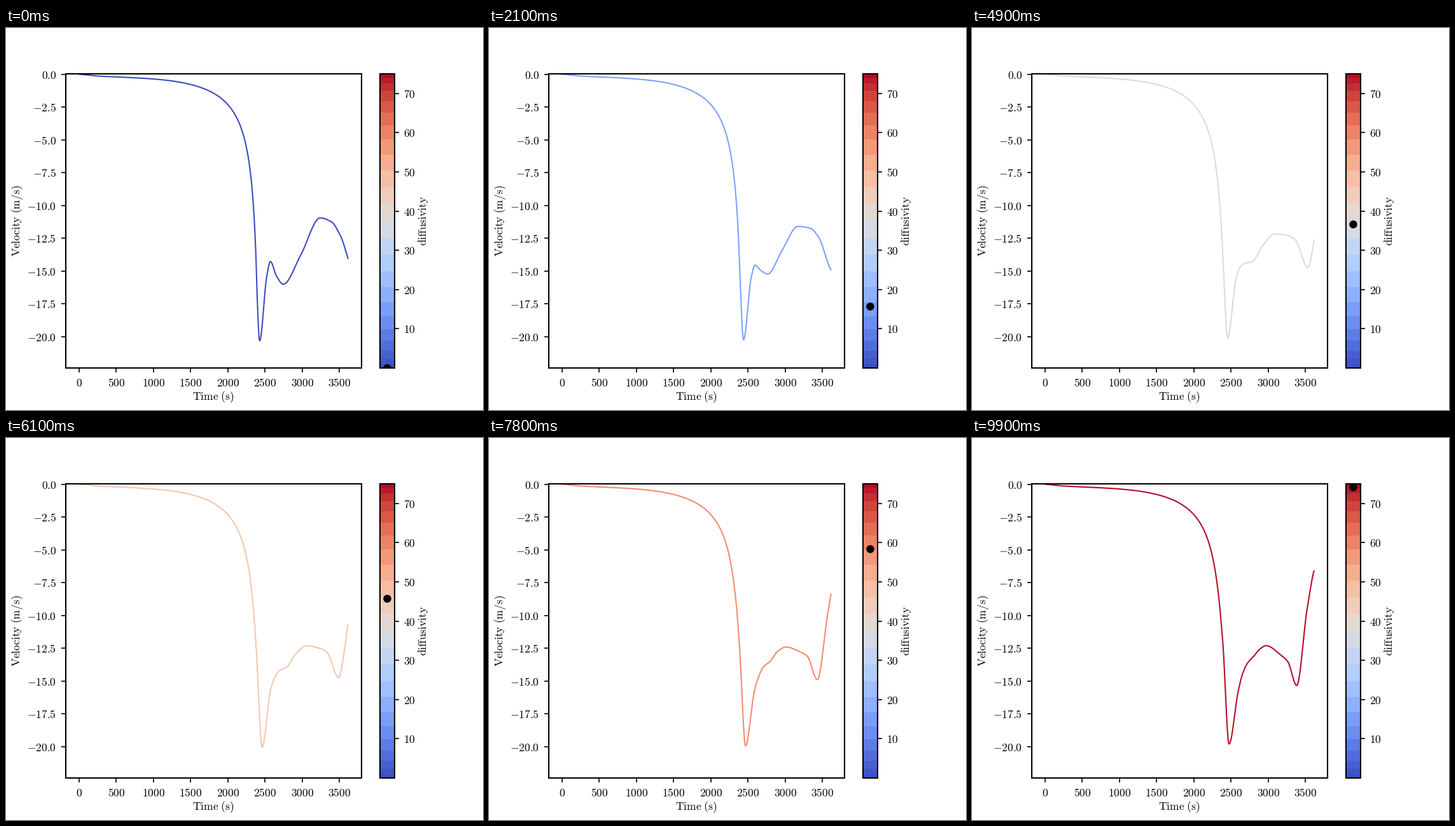
Recreate the animation shown at these times as a matplotlib script. Size 750 by 600 pixels, loop 10000 ms.

```python
import numpy as np
import matplotlib.pyplot as plt
from matplotlib.animation import FuncAnimation

plt.rcParams.update({"mathtext.fontset": "cm", "font.size": 8.4,
                     "axes.linewidth": 1})

FRAMES, D_MAX = 100, 75
T_END = 3.615  # thousands of seconds
cmap = plt.get_cmap("coolwarm")


def fall(s):
    """Slow start, then a hyperbolic plunge that stops short of its pole."""
    pole = 2.468
    d = np.geomspace(pole, 0.075, 40)
    t = pole - d
    drag = (0.796 * d + 0.577 * d ** 3 / (1 + (d / 2.22) ** 4)
            + 0.065 * s * np.exp(-d / 0.068))
    return t, -(1 - np.exp(-t / 0.21)) / drag


def turns(s):
    """Turning points, each gliding from a first to a last place."""
    ease = 1 - (1 - s) ** 1.3

    def glide(t0, v0, t1, v1, bow=0):
        return (t0 + (t1 - t0) * ease,
                v0 + (v1 - v0) * ease + bow * 4 * s * (1 - s))

    return np.transpose([
        glide(2.428, -20.31, 2.474, -19.79, -0.1),   # deepest dip
        glide(2.523, -15.42, 2.596, -15.81),
        glide(2.573, -14.27, 2.652, -14.50, -0.33),  # first crest
        glide(2.656, -15.40, 2.716, -13.68),
        glide(2.746, -16.00, 2.810, -13.07),         # shallow trough
        glide(2.981, -13.77, 2.887, -12.56),
        glide(3.242, -10.95, 2.972, -12.29, -0.44),  # second crest
        glide(3.400, -11.28, 3.169, -13.02),
        glide(3.511, -12.27, 3.263, -13.53, 0.36),
        glide(3.742, -15.60, 3.383, -15.37, 0.75),   # last trough
        glide(3.862, -12.75, 3.520, -9.60),
        glide(3.956, -9.36, 3.622, -6.45)])


def smooth(x, y, q):
    """Monotone cubic interpolation that keeps every turning point."""
    h = np.diff(x)
    d = np.diff(y) / h
    a, b = d[:-1], d[1:]
    w1, w2 = 2 * h[1:] + h[:-1], h[1:] + 2 * h[:-1]
    m = np.zeros(len(x))
    ok = np.flatnonzero(a * b > 0)
    m[ok + 1] = (w1 + w2)[ok] / (w1[ok] / a[ok] + w2[ok] / b[ok])
    m[0], m[-1] = d[0], 0.6 * d[-1]
    k = np.clip(np.searchsorted(x, q) - 1, 0, len(h) - 1)
    t = (q - x[k]) / h[k]
    s = t * t * (3 - 2 * t)
    return (y[k] + (y[k + 1] - y[k]) * s
            + h[k] * t * (1 - t) * (m[k] * (1 - t) - m[k + 1] * t))


time = np.linspace(0, T_END, 800)


def velocity(s):
    t, v = np.hstack([fall(s), turns(s)])
    return smooth(t, v, time)


def roman(text):
    return r"$\mathrm{%s}$" % text.replace(" ", r"\ ")


def label(x, y, text, turn=0):
    fig.text(x / 750, 1 - y / 600, roman(text), rotation=turn,
             ha="center", va="center")


fig = plt.figure(figsize=(5, 4), dpi=150, facecolor="white")
ax = fig.add_axes([0.125, 0.11, 0.62, 0.77])
ax.set(xlim=(-50 * T_END, 1050 * T_END), ylim=(-22.38, 0.025))
xticks, yticks = np.arange(0, 3501, 500), np.arange(-20, 0.1, 2.5)
ax.set_xticks(xticks, [roman(f"{v:d}") for v in xticks])
ax.set_yticks(yticks, [roman(f"{v:.1f}") for v in yticks])

# Colour steps are narrow at both ends and wide in the middle.
cax = fig.add_axes([0.78375, 0.11, 0.0308, 0.77])
u = np.linspace(-1, 1, 25)
edges = D_MAX / 2 * (1 + 1.4 * u - 0.4 * u ** 3)
mids = (edges[:-1] + edges[1:]) / 2
cax.pcolormesh([0, 1], edges, mids[:, None], cmap=cmap, vmin=0, vmax=D_MAX)
cax.set(xlim=(0, 1), ylim=(0, D_MAX), xticks=[])
levels = range(10, 71, 10)
cax.set_yticks(levels, [roman(str(v)) for v in levels])
cax.yaxis.tick_right()

label(326, 579.3, "Time (s)")
label(17.5, 303, "Velocity (m/s)", 90)
label(656.5, 303, "diffusivity", 90)

line, = ax.plot([], [], lw=1)
dot, = cax.plot([], [], "o", color="black", ms=6, mew=0)


def update(i):
    s = i / FRAMES
    line.set_data(time * 1000, velocity(s))
    line.set_color(cmap(s))
    dot.set_data([0.5], [D_MAX * s])
    return line, dot


anim = FuncAnimation(fig, update, frames=FRAMES, interval=100,
                     repeat=True, repeat_delay=0)
plt.show()
```
